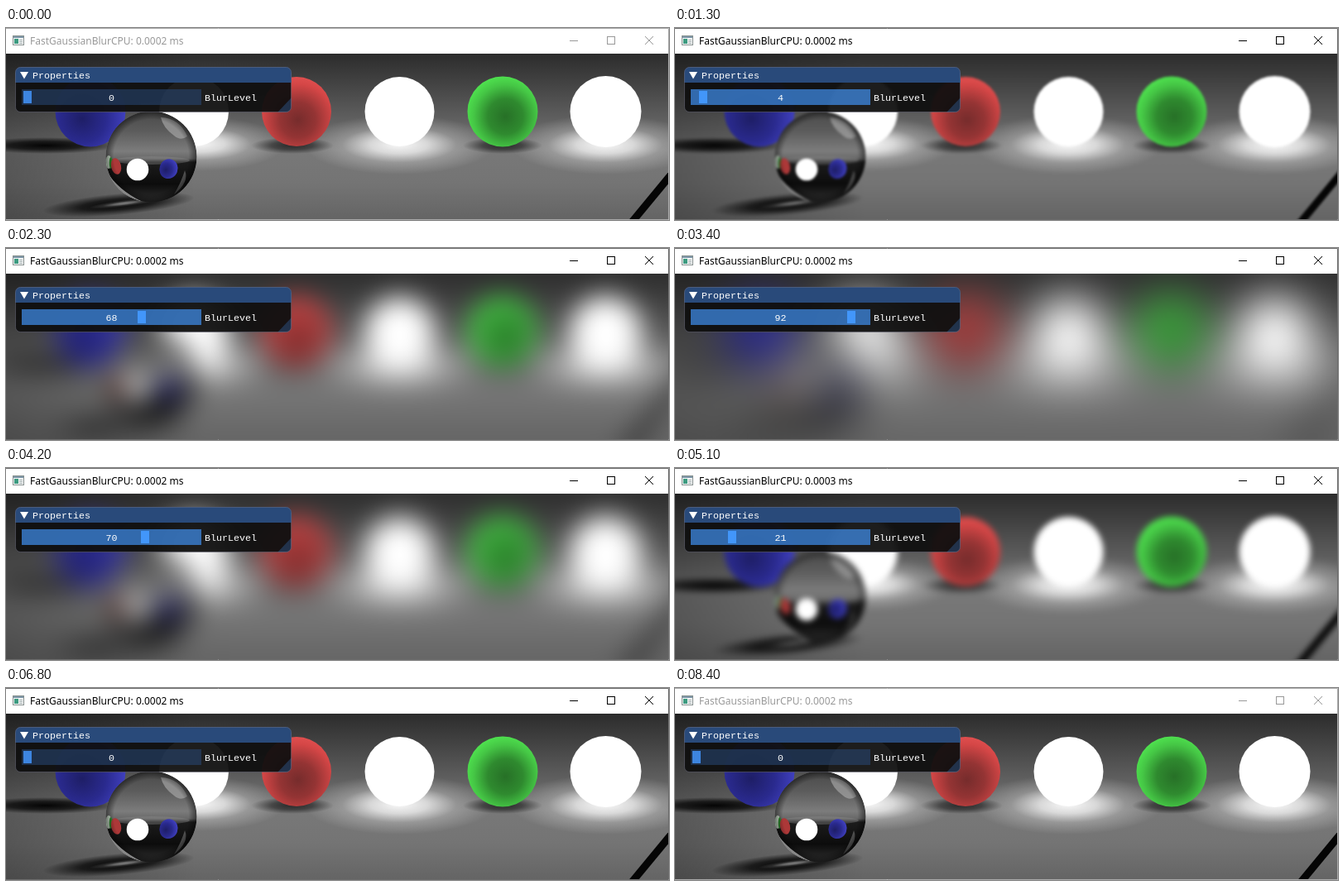
Animation of 801 by 232 pixels, one loop 8.5 s. Source, as an HTML page:

```html
<!DOCTYPE html>
<html lang="en">
<head>
<meta charset="utf-8">
<title>Blur level demo</title>
<style>
  html, body { margin: 0; width: 100%; height: 100%; overflow: hidden; background: #fff; }
  svg { display: block; width: 801px; height: 232px; }
  #title { font: 12px "Noto Sans", "Open Sans", sans-serif; }
  .ui { font: 11.67px "Liberation Mono", "DejaVu Sans Mono", monospace; fill: #fff; white-space: pre; }
  #win { --ink: #999; --edge: #a8a8a8; }
  #win.active { --ink: #000; --edge: #6a6a6a; }
  #title { fill: var(--ink); }
  .buttons { fill: none; stroke: var(--ink); }
  .edge { fill: none; stroke: var(--edge); }
</style>
</head>
<body>
<svg viewBox="0 0 801 232">
  <defs>
    <linearGradient id="floor" gradientUnits="userSpaceOnUse" x1="0" y1="31" x2="0" y2="232">
      <stop offset="0" stop-color="#2c2c2c"/>
      <stop offset=".18" stop-color="#434343"/>
      <stop offset=".4" stop-color="#606060"/>
      <stop offset=".58" stop-color="#787878"/>
      <stop offset=".78" stop-color="#747474"/>
      <stop offset="1" stop-color="#646464"/>
    </linearGradient>
    <linearGradient id="dim" gradientUnits="userSpaceOnUse" x1="0" y1="0" x2="230" y2="0">
      <stop offset="0" stop-opacity=".27"/>
      <stop offset="1" stop-opacity="0"/>
    </linearGradient>
    <radialGradient id="glow">
      <stop offset="0" stop-color="#fff" stop-opacity=".95"/>
      <stop offset=".3" stop-color="#fff" stop-opacity=".72"/>
      <stop offset=".6" stop-color="#fff" stop-opacity=".24"/>
      <stop offset="1" stop-color="#fff" stop-opacity="0"/>
    </radialGradient>
    <radialGradient id="shadow">
      <stop offset="0" stop-opacity=".95"/>
      <stop offset=".5" stop-opacity=".7"/>
      <stop offset="1" stop-opacity="0"/>
    </radialGradient>
    <radialGradient id="blue" cx=".38" cy=".6" r=".68">
      <stop offset="0" stop-color="#1e1e66"/>
      <stop offset=".5" stop-color="#2a2a8e"/>
      <stop offset="1" stop-color="#4444c8"/>
    </radialGradient>
    <radialGradient id="red" cx=".52" cy=".62" r=".64">
      <stop offset="0" stop-color="#762c2c"/>
      <stop offset=".4" stop-color="#943434"/>
      <stop offset=".8" stop-color="#d44646"/>
      <stop offset="1" stop-color="#e25050"/>
    </radialGradient>
    <radialGradient id="green" cx=".54" cy=".57" r=".6">
      <stop offset="0" stop-color="#277027"/>
      <stop offset=".42" stop-color="#2f8a2f"/>
      <stop offset=".75" stop-color="#45c645"/>
      <stop offset="1" stop-color="#50e650"/>
    </radialGradient>
    <linearGradient id="glass" x1="0" y1="0" x2="0" y2="1">
      <stop offset="0" stop-color="#4a4a4a"/>
      <stop offset=".22" stop-color="#5c5c5c"/>
      <stop offset=".44" stop-color="#7c7c7c"/>
      <stop offset=".52" stop-color="#686868"/>
      <stop offset=".56" stop-color="#1c1c1c"/>
      <stop offset=".8" stop-color="#0c0c0c"/>
      <stop offset="1" stop-color="#303030"/>
    </linearGradient>
    <radialGradient id="rim">
      <stop offset=".82" stop-opacity="0"/>
      <stop offset="1" stop-opacity=".5"/>
    </radialGradient>
    <clipPath id="view"><rect y="31" width="800" height="200"/></clipPath>
    <clipPath id="ball"><circle cx="175.5" cy="155.5" r="55"/></clipPath>
  </defs>

  <g clip-path="url(#view)">
    <g id="scene">
      <rect x="-80" y="-50" width="960" height="362" fill="url(#floor)"/>
      <rect x="-80" y="-50" width="310" height="362" fill="url(#dim)"/>

      <g fill="url(#glow)">
        <ellipse cx="233" cy="140" rx="105" ry="33"/>
        <ellipse cx="475" cy="141" rx="115" ry="36"/>
        <ellipse cx="724" cy="141" rx="115" ry="36"/>
      </g>
      <g fill="url(#shadow)">
        <ellipse cx="48" cy="142" rx="88" ry="10"/>
        <ellipse cx="346" cy="142" rx="50" ry="10" opacity=".65"/>
        <ellipse cx="600" cy="142" rx="48" ry="10" opacity=".65"/>
        <ellipse cx="136" cy="213" rx="92" ry="13" transform="rotate(-5 136 213)"/>
      </g>
      <ellipse cx="142" cy="212" rx="42" ry="4" fill="url(#glow)" opacity=".5" transform="rotate(-7 142 212)"/>

      <circle cx="102" cy="101" r="42.5" fill="url(#blue)"/>
      <circle cx="351" cy="101" r="42" fill="url(#red)"/>
      <circle cx="600" cy="101" r="42.5" fill="url(#green)"/>
      <g fill="#fff">
        <circle cx="227" cy="101" r="42"/>
        <circle cx="475.500" cy="101" r="42"/>
        <circle cx="724.500" cy="101" r="43"/>
      </g>

      <g clip-path="url(#ball)">
        <circle cx="175.500" cy="155.500" r="55" fill="url(#glass)"/>
        <ellipse cx="176" cy="160" rx="46" ry="5" fill="#909090" opacity=".35"/>
        <path d="M187 108Q210 109 219 131Q211 137 203 130Q190 121 187 108Z" fill="#aaa" opacity=".65"/>
        <path d="M122 174Q136 196 163 209L150 212L118 190Z" fill="#f2f2f2"/>
        <path d="M216 172Q222 186 203 201Q212 186 216 172Z" fill="#777" opacity=".6"/>
        <ellipse cx="124" cy="162" rx="3.500" ry="8" fill="#d8ecd8"/>
        <ellipse cx="126.500" cy="163" rx="1.800" ry="7" fill="#2c8a2c"/>
        <ellipse cx="133" cy="167" rx="6" ry="10" fill="#ac3838" transform="rotate(-12 133 167)"/>
        <circle cx="159" cy="171" r="13.300" fill="#fff"/>
        <ellipse cx="196.500" cy="170" rx="11" ry="12" fill="url(#blue)" transform="rotate(20 196 170)"/>
        <circle cx="175.500" cy="155.500" r="55" fill="url(#rim)"/>
      </g>

      <path d="M830 145L745 248" stroke="#050505" stroke-width="9"/>
    </g>
  </g>

  <g id="win">
    <rect width="801" height="31" fill="#fff"/>
    <g>
      <rect x="8.500" y="9.500" width="13" height="11" fill="#f4f6f6" stroke="#87908f"/>
      <rect x="9" y="10" width="12" height="2" fill="#7d96a8"/>
      <rect x="10" y="13" width="5" height="6" fill="#3c9a80"/>
      <path d="M16 14.500h4M16 16.500h4M16 18.500h4" stroke="#a9b3b5"/>
    </g>
    <text id="title" x="29" y="20">FastGaussianBlurCPU: 0.000<tspan id="digit">2</tspan> ms</text>
    <g class="buttons">
      <path d="M681 15.500h10"/>
      <rect x="726.500" y="10.500" width="9" height="9"/>
      <path d="M772 10L782 20M782 10L772 20"/>
    </g>
    <path class="edge" d="M0 .5H800.500V231.500H0"/>
  </g>

  <rect x="11.500" y="47.500" width="333" height="54" rx="6" fill="#0f0f0f" fill-opacity=".94"/>
  <path d="M11 66V54a7 7 0 0 1 7-7H338a7 7 0 0 1 7 7V66Z" fill="#294a7a"/>
  <path d="M345 84V95a7 7 0 0 1-7 7H328Z" fill="#4296fa" fill-opacity=".25"/>
  <rect x="11.500" y="47.500" width="333" height="54" rx="6" fill="none" stroke="#6e6e80" stroke-opacity=".5"/>
  <path d="M17 53H27L22 61.500Z" fill="#fff"/>
  <text class="ui" x="32" y="61">Properties</text>
  <rect id="track" x="19" y="74" width="217" height="19"/>
  <rect id="grab" y="76" width="10" height="15"/>
  <text class="ui" id="value" x="127.500" y="88" text-anchor="middle">0</text>
  <text class="ui" x="240" y="88">BlurLevel</text>
</svg>

<script>
  const $ = id => document.getElementById(id);
  const LOOP = 8500, TICK = 100;

  // [tick, blur level] while the slider is dragged
  const drag = [[10, 0], [11, 1], [13, 4], [15, 13], [23, 68], [27, 92],
                [38, 92], [42, 70], [51, 21], [56, 3], [59, 0]];
  // ticks at which the timing in the title flips
  const flips = [[1, 8], [10, 30], [34, 36], [39, 59], [65, 67], [72, 82], [84, 84]];

  function levelAt(k) {
    if (k <= drag[0][0]) return 0;
    const i = drag.findIndex(p => p[0] >= k);
    if (i < 0) return 0;
    const [k0, v0] = drag[i - 1], [k1, v1] = drag[i];
    return Math.round(v0 + (v1 - v0) * (k - k0) / (k1 - k0));
  }

  function digitAt(k) {
    const n = flips.reduce((sum, [a, b]) => sum + Math.max(0, Math.min(k, b) - a + 1), 0);
    return 2 + n % 2;
  }

  const sigma = v => v ? 1 + 0.0945 * v + 0.00186 * v * v : 0;

  function draw(k) {
    const v = levelAt(k), s = sigma(v);
    const held = k >= 10 && k < 65, hover = k >= 65 && k < 67;
    $('scene').style.filter = s ? `blur(${s.toFixed(2)}px)` : 'none';
    $('win').classList.toggle('active', k >= 10 && k < 84);
    $('digit').textContent = digitAt(k);
    $('value').textContent = v;
    $('grab').setAttribute('x', Math.round(21 + v * 2.03));
    $('grab').setAttribute('fill', held ? '#4296fa' : '#3d85e0');
    $('track').setAttribute('fill', held ? 'rgba(66,150,250,.67)'
      : hover ? 'rgba(66,150,250,.4)' : 'rgba(41,74,122,.54)');
  }

  let last = -1;
  function frame(now) {
    const k = Math.floor(now % LOOP / TICK);
    if (k !== last) draw(last = k);
    requestAnimationFrame(frame);
  }
  draw(0);
  requestAnimationFrame(frame);
</script>
</body>
</html>
```
